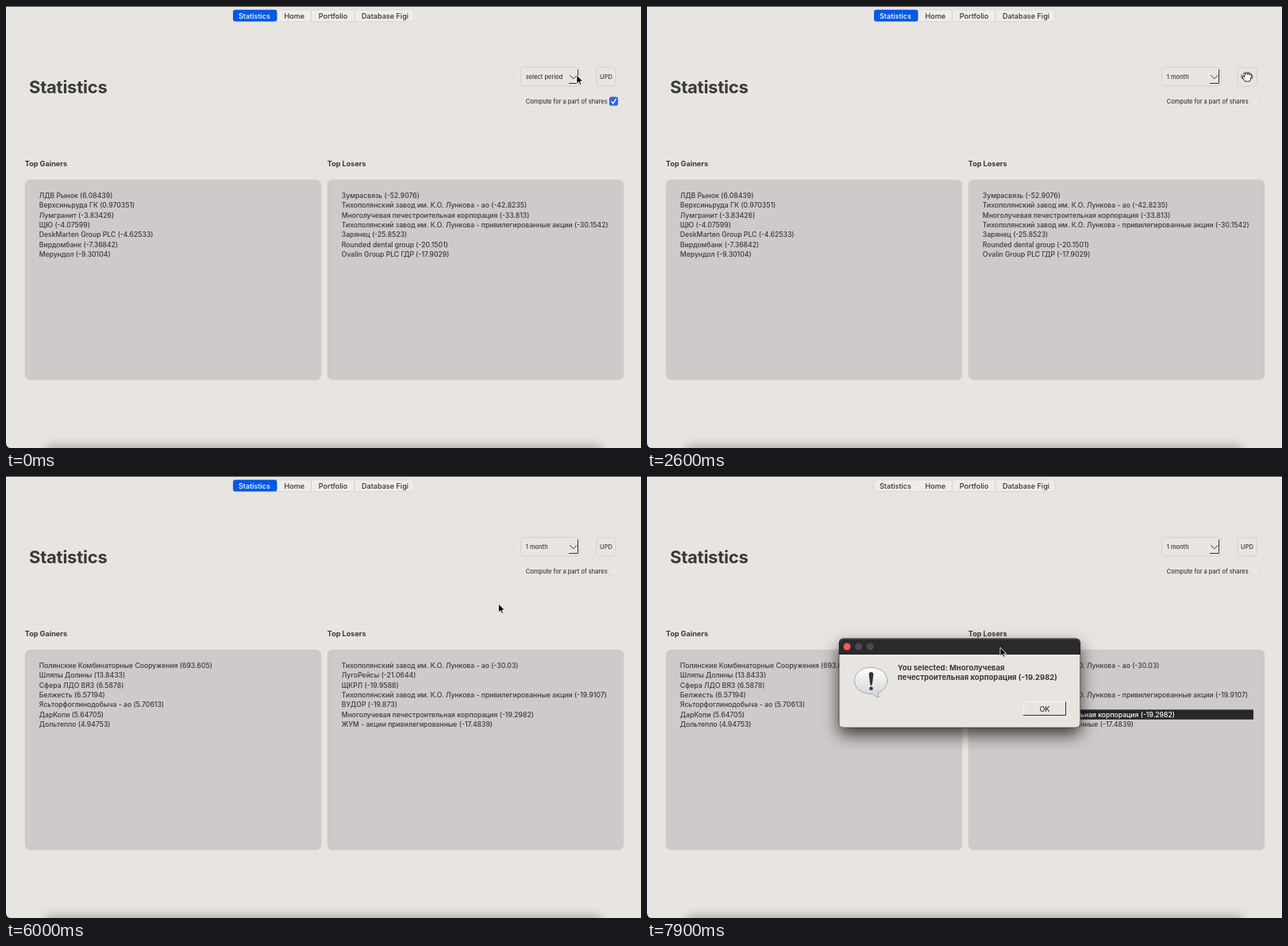
Animation of 800x557 px, one loop 8 s. Source, as an HTML page:

```html
<!DOCTYPE html>
<html lang="en">
<head>
<meta charset="utf-8">
<title>Statistics</title>
<style>
  html, body { margin: 0; width: 100%; height: 100%; overflow: hidden; background: #e8e5e1; }
  svg { display: block; width: 800px; height: 557px; }
  text { font-family: Inter, Roboto, "Open Sans", sans-serif; fill: #3b3a3a; white-space: pre; }
  .title { font-size: 22px; font-weight: 700; letter-spacing: -.25px; }
  .bold { font-size: 9.1px; font-weight: 700; }
  .note { font-size: 9.5px; font-weight: 700; }
  .tab { font-size: 9.1px; font-weight: 500; fill: #333; }
  .row { font-size: 8.65px; font-weight: 500; }
  .small { font-size: 7.5px; font-weight: 500; }
  .mid { text-anchor: middle; }
  .box { fill: #e9e6e2; stroke: #cfcbc8; stroke-width: .8; }
  .panel { fill: #cecac9; }
  .line { fill: none; stroke: #333; stroke-width: 1; }
  #menu { filter: drop-shadow(0 2px 3px rgba(0,0,0,.35)); }
  #dialog { transform-origin: 394px 261px; }
  #frame { filter: drop-shadow(0 9px 10px rgba(0,0,0,.7)); }
</style>
</head>
<body>
<svg viewBox="0 0 800 557">
  <defs>
    <linearGradient id="bubble" x1="0" y1="0" x2="0" y2="1">
      <stop offset="0" stop-color="#fff"/>
      <stop offset="1" stop-color="#d3d3d5"/>
    </linearGradient>
    <filter id="soft" x="-10%" y="-200%" width="120%" height="500%">
      <feGaussianBlur stdDeviation="6"/>
    </filter>
  </defs>

  <rect width="800" height="557" fill="#e8e5e1"/>
  <rect x="48" y="553" width="704" height="24" rx="10" opacity=".23" filter="url(#soft)"/>
  <rect width="800" height="1" fill="#4a4949"/>
  <path d="M0 551Q.5 556.5 5 557H0Z"/>

  <!-- tabs -->
  <rect x="286" y="5" width="228" height="14.6" rx="3.5" fill="#efecea" stroke="#d6d2cf" stroke-width=".7"/>
  <path d="M384.5 6V19M439 6V19" stroke="#d3cfcc"/>
  <rect id="active" x="286" y="4.8" width="55.5" height="14.8" rx="3" fill="#0759e3"/>
  <g id="tabs"></g>

  <text class="title" x="29" y="110">Statistics</text>

  <!-- controls -->
  <rect class="box" x="648.5" y="77.3" width="74.5" height="23.7" rx="3.5"/>
  <text class="small" id="period" x="654.8" y="91.9"></text>
  <path class="line" d="M720.5 80V97.5H709M710.3 87.2L714.8 91.8L719.3 87.2"/>
  <rect class="box" x="744" y="77.3" width="24" height="23.7" rx="3.5"/>
  <text class="small mid" x="756" y="91.9">UPD</text>
  <text class="small" x="654.8" y="122.9">Compute for a part of shares</text>
  <rect x="760.5" y="115" width="10.4" height="10.4" rx="2.5" fill="#eae7e4" stroke="#d8d4d1" stroke-width=".7"/>
  <g id="check">
    <rect x="760" y="114.6" width="11" height="11" rx="2.6" fill="#2567dd"/>
    <path d="M762.9 120.4L764.9 122.8L768.3 117.3" fill="none" stroke="#fff" stroke-width="1.4" stroke-linecap="round"/>
  </g>

  <!-- lists -->
  <text class="bold" x="23.8" y="201.8">Top Gainers</text>
  <text class="bold" x="404.8" y="201.8">Top Losers</text>
  <rect class="panel" x="23.7" y="218.7" width="373.6" height="252.8" rx="7"/>
  <rect class="panel" x="404.7" y="218.7" width="373.6" height="252.8" rx="7"/>
  <rect id="mark" x="419" y="294.4" width="345" height="12.4"/>
  <g id="before"></g>
  <g id="after"></g>

  <!-- period menu -->
  <g id="menu">
    <rect x="640.8" y="75" width="67" height="42" rx="4" fill="#333"/>
    <rect x="640.8" y="81" width="67" height="30" fill="#e8e5e1"/>
    <text class="small" x="659" y="89.2">1 day</text>
    <text class="small" x="659" y="99.3">1 week</text>
    <text class="small" x="659" y="109.3">1 month</text>
    <path id="tick" d="M643.6 106.6L645.4 109L649 103.4" class="line"/>
  </g>

  <!-- message box -->
  <g id="dialog">
    <rect id="frame" x="241.7" y="204.5" width="304.4" height="112.8" rx="5.8" fill="#1b191b"/>
    <path d="M242.3 225H545.5V311.5Q545.5 316.7 540.4 316.7H247.4Q242.3 316.7 242.3 311.5Z" fill="#e8e5e1"/>
    <path d="M242.3 224.5V210.4Q242.3 205.1 247.6 205.1H540.2Q545.5 205.1 545.5 210.4V224.5Z" fill="#2c292c"/>
    <path d="M243 210Q243.3 205.7 247.6 205.6H540.2Q544.5 205.7 544.8 210" fill="none" stroke="#5b585b" stroke-width=".7"/>
    <circle cx="252" cy="215" r="4.5" fill="#fc5a52"/>
    <circle cx="266.6" cy="215" r="4.5" fill="#4c494b"/>
    <circle cx="281.1" cy="215" r="4.5" fill="#4c494b"/>
    <path d="M282 241.2C293.5 241.2 302.6 248.4 302.6 258C302.6 264.6 298 270.2 291 273Q290.6 276.4 292.3 278.8Q286.6 277.6 284.4 274.7C271.5 275.5 261.4 267.8 261.4 258C261.4 248.4 270.5 241.2 282 241.2Z" fill="url(#bubble)" stroke="#96969a" stroke-width=".8"/>
    <path d="M279.6 248.6Q282.4 245.2 285.2 248.6Q284.8 257.5 283.2 264H281.6Q280 257.5 279.6 248.6Z" fill="#333"/>
    <circle cx="282.4" cy="267.8" r="2.3" fill="#333"/>
    <text class="note" x="315.8" y="244.7">You selected: Многолучевая</text>
    <text class="note" x="315.8" y="256.5">печестроительная корпорация (-19.2982)</text>
    <path d="M474.5 301V284.5H527" fill="none" stroke="#f5f3f1"/>
    <path class="line" d="M527.5 284.5V301.5H474"/>
    <text class="tab mid" x="501" y="297.2">OK</text>
  </g>

  <g id="pointer">
    <path id="arrow" d="M0 0V10.9L2.5 8.6L4.1 12.3L5.9 11.5L4.3 7.9H7.7Z" fill="#000" stroke="#fff" stroke-width=".8" stroke-linejoin="round"/>
    <path id="hand" d="M-2.6 6L-5.4 1.6Q-6.6-.4-5.2-.8Q-4.2-1-3 .8L-4.2-3.4Q-4.2-5-3-4.8Q-2.2-4.6-1.6-2.4Q-2-6-.7-6Q.6-6 .8-2.6Q1.2-5.8 2.3-5.5Q3.4-5.2 3-1.9Q3.9-4.4 5-3.8Q6-3.2 5 .6Q4.4 4 3.4 6Z" fill="#fff" stroke="#111" stroke-width=".9" stroke-linejoin="round"/>
  </g>
</svg>

<script>
const $ = id => document.getElementById(id);
const LOOP = 8000, STEP = 100;

const plant = "Тихополянский завод им. К.О. Лункова";
const union = "Многолучевая печестроительная корпорация";
const pref = "привилегированные";

const oldLists = [
  ["ЛДВ Рынок (6.08439)", "Верхсиньруда ГК (0.970351)", "Лумгранит (-3.83426)", "ЩЮ (-4.07599)",
   "DeskMarten Group PLC (-4.62533)", "Вирдомбанк (-7.36842)", "Мерундол (-9.30104)"],
  ["Зумрасвязь (-52.9076)", `${plant} - ао (-42.8235)`, `${union} (-33.813)`,
   `${plant} - ${pref} акции (-30.1542)`, "Зарянец (-25.8523)",
   "Rounded dental group (-20.1501)", "Ovalin Group PLC ГДР (-17.9029)"]
];
const newLists = [
  ["Полянские Комбинаторные Сооружения (693.605)", "Шляпы Долины (13.8433)", "Сфера ЛДО ВЯЗ (6.5878)",
   "Белжесть (6.57194)", "Ясьторфоглинодобыча - ао (5.70613)", "ДарКопи (5.64705)", "Дольтепло (4.94753)"],
  [`${plant} - ао (-30.03)`, "ЛугоРейсы (-21.0644)", "ЩКРЛ (-19.9588)",
   `${plant} - ${pref} акции (-19.9107)`, "ВУДОР (-19.873)",
   `${union} (-19.2982)`, `ЖУМ - акции ${pref} (-17.4839)`]
];

function addText(parent, cls, x, y, str) {
  const el = document.createElementNS("http://www.w3.org/2000/svg", "text");
  el.setAttribute("class", cls);
  el.setAttribute("x", x);
  el.setAttribute("y", y);
  el.textContent = str;
  return parent.appendChild(el);
}

function fill(group, lists) {
  return lists.map((list, col) =>
    list.map((str, i) => addText(group, "row", 41.8 + col * 381, 242.1 + i * 12.3, str)));
}

const tabs = [["Statistics", 313], ["Home", 363.3], ["Portfolio", 412], ["Database Figi", 477.5]]
  .map(([name, x]) => addText($("tabs"), "tab mid", x, 15.6, name));
fill($("before"), oldLists);
const picked = fill($("after"), newLists)[1][5];

// pointer stops: time, x, y
const path = [
  [0, 719, 87], [400, 719, 87], [1300, 685, 104], [1500, 685, 104], [1800, 763, 121], [1950, 763, 121],
  [2200, 755, 90], [2600, 756, 89], [2700, 756, 89], [3200, 626, 150], [5900, 626, 150],
  [6500, 553, 300], [7000, 553, 300], [7600, 497, 287], [7700, 497, 287], [7900, 445, 216], [8000, 445, 216]
];

function pointerAt(t) {
  const i = path.findIndex(p => p[0] > t);
  const [t0, x0, y0] = path[i - 1], [t1, x1, y1] = path[i];
  const k = (t - t0) / (t1 - t0), e = k * k * (3 - 2 * k);
  return [x0 + (x1 - x0) * e, y0 + (y1 - y0) * e];
}

const show = (id, on) => { $(id).style.display = on ? "" : "none"; };

function draw(t) {
  const [x, y] = pointerAt(t);
  const overButton = x > 744 && x < 768 && y > 77 && y < 101;
  $("pointer").setAttribute("transform", `translate(${x} ${y})`);
  show("arrow", !overButton);
  show("hand", overButton);

  $("period").textContent = t < 1400 ? "select period" : "1 month";
  show("menu", t >= 100 && t < 1500);
  $("menu").style.opacity = t < 1400 ? 1 : .62;
  show("tick", t >= 1400);
  show("check", t < 1900);

  show("before", t < 4500);
  show("after", t >= 4500);

  const modal = t >= 6900, marked = t >= 6600;
  show("active", !modal);
  tabs[0].style.fill = modal ? "" : "#fff";
  show("mark", marked);
  $("mark").style.fill = modal ? "#29272b" : "#0330cb";
  picked.style.fill = marked ? "#fff" : "";

  show("dialog", t >= 6800);
  $("dialog").style.opacity = modal ? 1 : .5;
  $("dialog").style.transform = `scale(${t < 6900 ? .39 : t < 7000 ? .93 : 1})`;
}

const start = performance.now();
function tick() {
  const t = (performance.now() - start) % LOOP;
  draw(Math.floor(t / STEP) * STEP);
  requestAnimationFrame(tick);
}
tick();
</script>
</body>
</html>
```
